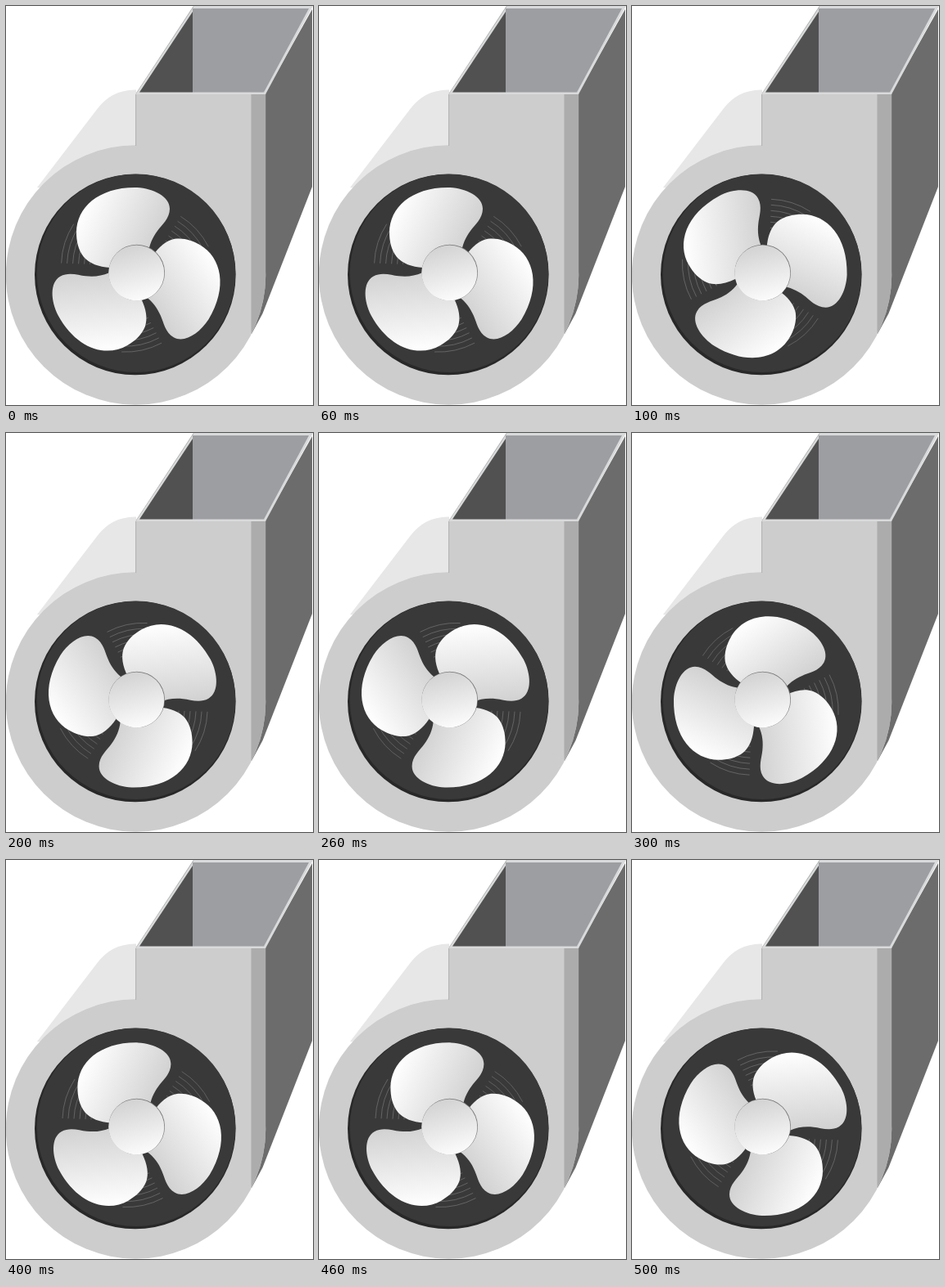
Animation, 375 px wide and 488 px high, one loop 600 ms. Source, as an HTML page with a canvas:

```html
<!DOCTYPE html>
<html lang="en">
<head>
<meta charset="utf-8">
<title>Blower fan</title>
<style>
  html, body { margin: 0; width: 100%; height: 100%; overflow: hidden; background: #fff; }
  canvas { display: block; width: 375px; height: 488px; }
</style>
</head>
<body>
<canvas id="stage"></canvas>
<script>
const W = 375, H = 488, STEP = 100;
const canvas = document.getElementById('stage');
const ctx = canvas.getContext('2d');
const ratio = window.devicePixelRatio || 1;
canvas.width = W * ratio;
canvas.height = H * ratio;

// Rotor poses: angle in degrees and axle position
const poses = [
  [0, 157, 328], [-30, 156.6, 325.7], [-60, 156.6, 327.5],
  [-90, 157, 328.8], [-120, 158.4, 329.4], [-180, 162, 329]
];

const blade = new Path2D('M-10 0L-30 -8C-44 -9 -55 -13 -62 -21C-69 -30 -71 -41 -71 -51' +
  'C-71 -82 -43 -107 3 -106C23 -105 43 -95 43 -80C43 -68 33 -60 28 -53C22 -45 18 -36 17 -26L10 0Z');

const rad = deg => deg * Math.PI / 180;

function shape(d, fill) {
  ctx.fillStyle = fill;
  ctx.fill(new Path2D(d));
}

function disc(x, y, r, fill) {
  ctx.beginPath();
  ctx.arc(x, y, r, 0, Math.PI * 2);
  ctx.fillStyle = fill;
  ctx.fill();
}

function line(d, color, width) {
  ctx.strokeStyle = color;
  ctx.lineWidth = width;
  ctx.stroke(new Path2D(d));
}

function fade(x0, y0, x1, y1, from, to) {
  const g = ctx.createLinearGradient(x0, y0, x1, y1);
  g.addColorStop(0, from);
  g.addColorStop(1, to);
  return g;
}

function drawCasing() {
  shape('M159 102.5C139 102 122 111 111 126.5L38 222L159 240Z', '#e7e7e7');
  shape('M316 108L374 4V221L313.5 376L300 401Z', '#6c6c6c');
  disc(158.5, 329, 158.7, '#cdcdcd');
  shape('M158.5 107H300V400L158.5 330Z', '#cdcdcd');
  shape('M299.5 107H317.2V329A158.7 158.7 0 0 1 299.5 401Z', '#acacac');
  line('M158.6 108V171', '#a8a8a8', 0.8);

  shape('M159 108L229 0H375L317 108Z', '#d9dadb');
  shape('M163 105.5L228 7V105.5Z', '#515151');
  shape('M228 3H370L315 105.5H228Z', '#9d9ea2');
  line('M159 107L229 0.5', '#8d8d8d', 0.6);

  disc(157.8, 328.5, 122.8, '#282828');
  disc(159, 326.8, 121.2, '#393939');
}

function eachThird(draw) {
  for (let i = 0; i < 3; i++) {
    ctx.save();
    ctx.rotate(rad(120 * i));
    draw();
    ctx.restore();
  }
}

function drawRotor([angle, x, y]) {
  ctx.save();
  ctx.translate(x, y);
  ctx.rotate(rad(angle));
  ctx.strokeStyle = '#707070';
  ctx.lineWidth = 0.7;
  eachThird(() => {
    for (let r = 59; r <= 94; r += 7) {
      ctx.beginPath();
      ctx.arc(6.5, 9, r, rad(-58), rad(-27));
      ctx.stroke();
    }
  });
  const shade = fade(-58, -81, 32, -39, '#fdfdfd', '#cfcfcf');
  eachThird(() => {
    ctx.fillStyle = shade;
    ctx.fill(blade);
  });
  ctx.restore();
}

function drawHub() {
  disc(159.7, 326, 34.3, '#777');
  disc(159.3, 326.4, 34, fade(150, 293, 168, 360, '#d2d2d2', '#fcfcfc'));
}

function render(now) {
  const pose = poses[Math.floor(now / STEP) % poses.length];
  ctx.setTransform(ratio, 0, 0, ratio, 0, 0);
  ctx.fillStyle = '#fff';
  ctx.fillRect(0, 0, W, H);
  drawCasing();
  drawRotor(pose);
  drawHub();
}

const start = performance.now();
function tick() {
  render(performance.now() - start);
  requestAnimationFrame(tick);
}
tick();
</script>
</body>
</html>
```
